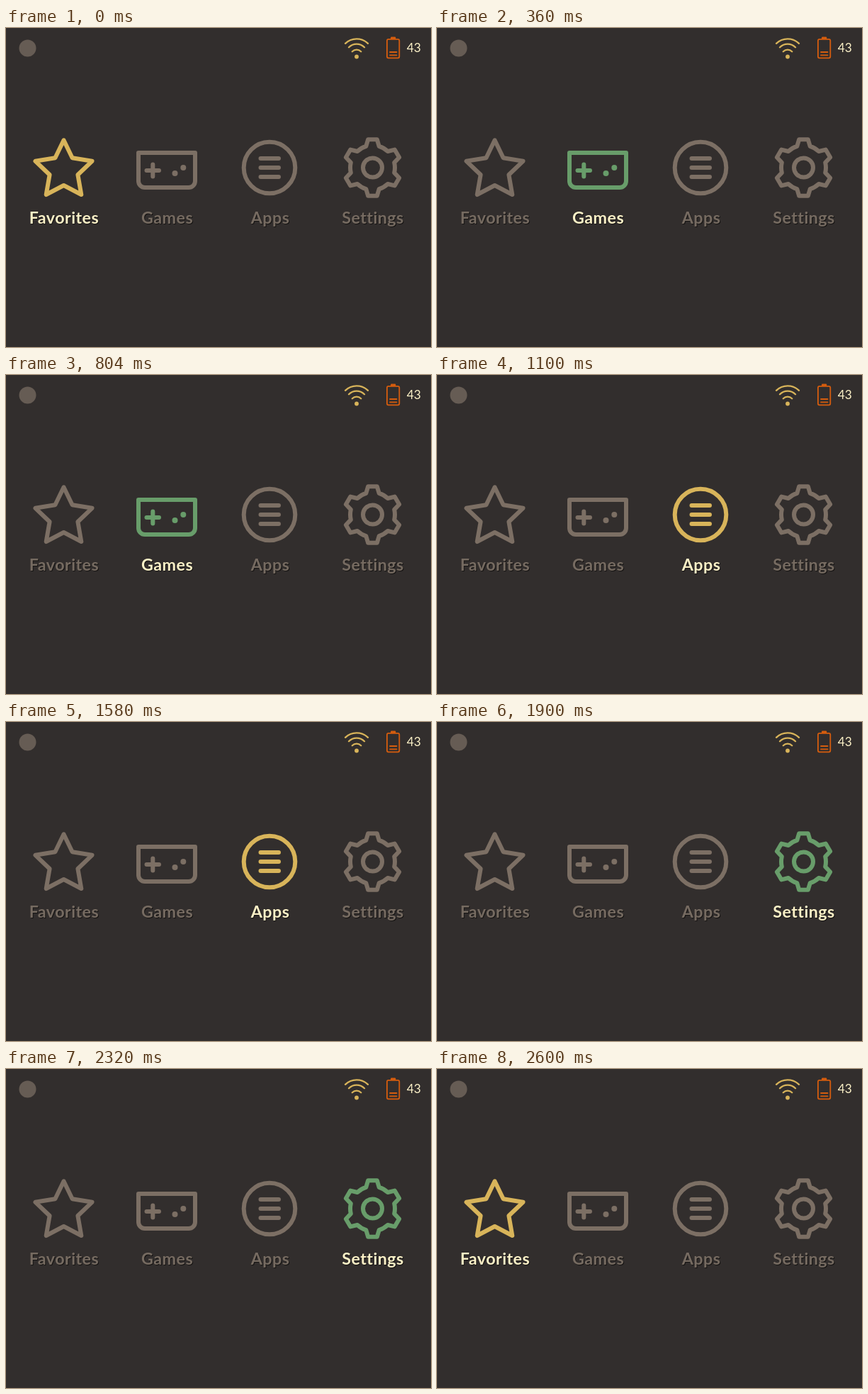
An HTML page for the animation above (2720 ms loop, 600x450 px).

```html
<!DOCTYPE html>
<html lang="en">
<head>
<meta charset="utf-8">
<title>Launcher menu</title>
<style>
  html, body { margin: 0; width: 100%; height: 100%; overflow: hidden; background: #322e2d; }
  svg { display: block; width: 600px; height: 450px; }
  .line { fill: none; stroke: currentColor; stroke-linecap: round; stroke-linejoin: round; }
  .menu .line { stroke-width: 6; }
  .dot { fill: currentColor; }
  text { font-family: Lato, "Open Sans", sans-serif; text-anchor: middle; }
  .label { font-size: 23.3px; font-weight: 700; letter-spacing: .45px; filter: drop-shadow(1px 1.6px .5px #151312); }
</style>
</head>
<body>
<svg viewBox="0 0 600 450">
  <rect width="600" height="450" fill="#322e2d"/>

  <circle cx="30.5" cy="28.5" r="12" fill="#665c54"/>

  <g color="#d8b45a" stroke-width="2.3">
    <path class="line" d="M479 21.8A23 23 0 0 1 511 21.8M484 27.3A15.5 15.5 0 0 1 506 27.3M488.8 33.3A8.7 8.7 0 0 1 501.2 33.3"/>
    <circle class="dot" cx="495" cy="40.5" r="2.9"/>
  </g>
  <g color="#d65d0e" stroke-width="1.8">
    <rect class="line" x="537.9" y="15.9" width="17.4" height="26.4" rx="2"/>
    <path class="line" d="M542 34H551.5M542 38.3H551.5"/>
    <rect class="dot" x="543" y="12.4" width="7.2" height="3.6" rx="1.2"/>
  </g>
  <text x="575.8" y="33.8" font-size="17.3" fill="#fbf1c7">43</text>

  <g class="menu">
    <g class="item">
      <path class="line" d="M81.5 158.3L93.6 183.3L121.5 187.8L101.4 207L106.3 235L81.5 222L56.7 235L61.6 207L41.5 187.8L69.4 183.3Z"/>
      <text class="label" x="82" y="276">Favorites</text>
    </g>
    <g class="item">
      <path class="line" d="M187 176H267V216A9 9 0 0 1 258 225H196A9 9 0 0 1 187 216Z"/>
      <path class="line" d="M198.5 201H216M207.3 192.5V209.5"/>
      <circle class="dot" cx="238.5" cy="205" r="4"/>
      <circle class="dot" cx="250.3" cy="197" r="4"/>
      <text class="label" x="227.5" y="276">Games</text>
    </g>
    <g class="item">
      <circle class="line" cx="372" cy="197" r="36.3"/>
      <path class="line" d="M359.5 184H385M359.5 197H385M359.5 210H385"/>
      <text class="label" x="373" y="276">Apps</text>
    </g>
    <g class="item">
      <path class="line" id="gear"/>
      <circle class="line" cx="517.5" cy="197" r="13.5"/>
      <text class="label" x="518" y="276">Settings</text>
    </g>
  </g>
</svg>
<script>
const LOOP = 2720;
const STEPS = [[2600, 0], [1900, 3], [1100, 2], [360, 1], [0, 0]];
const ACCENTS = ["#d8b45a", "#689d6a", "#d8b45a", "#689d6a"];
const items = [...document.querySelectorAll(".item")];
const labels = items.map(item => item.querySelector(".label"));

function gearPath(cx, cy, teeth, inner, outer) {
  const point = (r, deg) => {
    const a = deg * Math.PI / 180;
    return (cx + r * Math.sin(a)).toFixed(2) + " " + (cy - r * Math.cos(a)).toFixed(2);
  };
  let d = "";
  for (let i = 0; i < teeth; i++) {
    const a = i * 360 / teeth;
    d += i ? `A${inner} ${inner} 0 0 1 ` : "M";
    d += `${point(inner, a - 17)}L${point(outer, a - 9)}L${point(outer, a + 9)}L${point(inner, a + 17)}`;
  }
  return d + `A${inner} ${inner} 0 0 1 ${point(inner, -17)}Z`;
}

function render(ms) {
  const t = ms % LOOP;
  const active = STEPS.find(step => t >= step[0])[1];
  items.forEach((item, i) => {
    item.setAttribute("color", i === active ? ACCENTS[i] : "#7c6f64");
    labels[i].setAttribute("fill", i === active ? "#fbf1c7" : "#766b61");
  });
}

document.getElementById("gear").setAttribute("d", gearPath(517.5, 197, 6, 31.5, 40.3));

let start;
function tick(now) {
  start ??= now;
  render(now - start);
  requestAnimationFrame(tick);
}
render(0);
requestAnimationFrame(tick);
</script>
</body>
</html>
```
